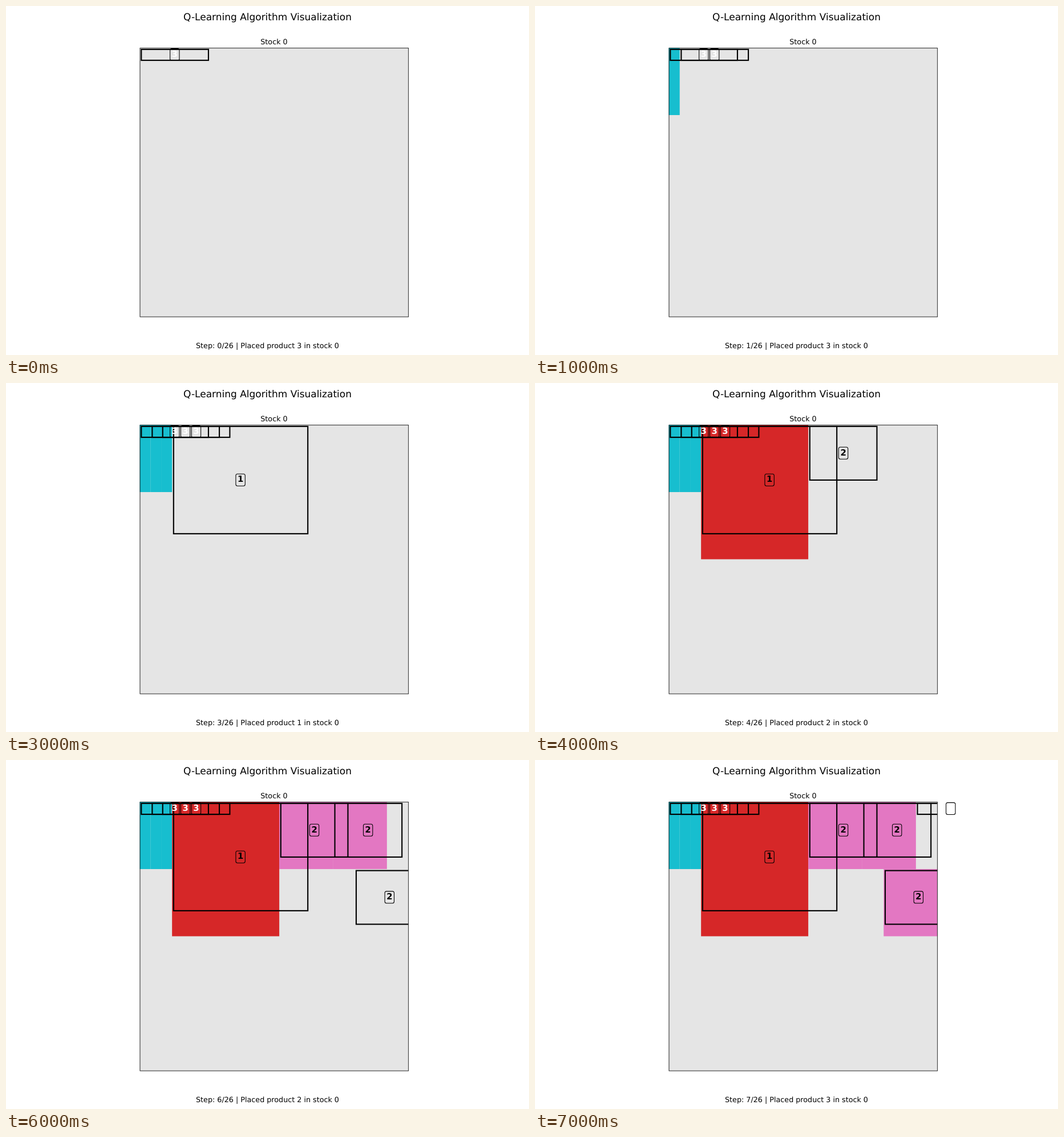
An HTML page for the animation above (8000 ms loop, 917 by 611 pixels).

```html
<!DOCTYPE html>
<html lang="en">
<head>
<meta charset="utf-8">
<title>Q-Learning Algorithm Visualization</title>
<style>
  html, body { margin: 0; width: 100%; height: 100%; overflow: hidden; background: #fff; }
  svg { display: block; width: 917px; height: 611px; }
  text { font-family: "DejaVu Sans", sans-serif; font-size: 16.667px; text-anchor: middle; text-rendering: geometricPrecision; white-space: pre; }
  .title { font-size: 22.222px; }
  .label text { font-size: 19.444px; font-weight: bold; }
  .outline { fill: none; stroke: #000; stroke-width: 2.78; }
  .label rect { fill: none; stroke: #000; stroke-width: 1.39; }
  .axes { fill: none; stroke: #000; stroke-width: 1.11; }
</style>
</head>
<body>
<svg viewBox="0 0 1200 800" preserveAspectRatio="none">
  <clipPath id="plot"><rect x="307" y="96" width="616" height="616"/></clipPath>
  <text class="title" x="600" y="33">Q-Learning Algorithm Visualization</text>
  <text x="615" y="87.7">Stock 0</text>
  <rect x="307" y="96" width="616" height="616" fill="#e5e5e5"/>
  <g id="fills"></g>
  <g id="outlines" clip-path="url(#plot)"></g>
  <rect class="axes" x="307.5" y="96.5" width="616" height="616"/>
  <g id="labels"></g>
  <text id="caption" x="600" y="784"></text>
</svg>
<script>
const STEP_MS = 1000, LEFT = 307, TOP = 96, CELL = 6.16;

// Size in cells, fill and label colour of each product
const products = {
  1: { w: 50, h: 40, fill: '#d62728', ink: '#000' },
  2: { w: 25, h: 20, fill: '#e377c2', ink: '#000' },
  3: { w: 25, h: 4, fill: '#17becf', ink: '#fff' }
};

// One placement per step: product, column, row
const placements = [
  [3, 0, 0], [3, 4, 0], [3, 8, 0], [1, 12, 0],
  [2, 52, 0], [2, 72, 0], [2, 80, 25], [3, 92, 0]
];

const byId = id => document.getElementById(id);
const snap = v => Math.round(v) + 0.5;

function add(parent, tag, attrs) {
  const el = document.createElementNS('http://www.w3.org/2000/svg', tag);
  for (const key in attrs) el.setAttribute(key, attrs[key]);
  return parent.appendChild(el);
}

function addBox(parent, x0, y0, x1, y1, attrs) {
  return add(parent, 'rect', { x: x0, y: y0, width: x1 - x0, height: y1 - y0, ...attrs });
}

const pieces = placements.map(([id, col, row]) => {
  const { w, h, fill, ink } = products[id];
  const x = LEFT + col * CELL, y = TOP + row * CELL;

  // The filled area is transposed relative to the outline
  const area = addBox(byId('fills'), Math.round(x), Math.round(y),
    Math.round(x + h * CELL), Math.round(y + w * CELL), { fill });

  const ox = x + CELL / 2, oy = y + CELL / 2;
  const outline = addBox(byId('outlines'), snap(ox), snap(oy),
    snap(ox + w * CELL), snap(oy + h * CELL), { class: 'outline' });

  const cx = ox + w * CELL / 2, cy = oy + h * CELL / 2;
  const label = add(byId('labels'), 'g', { class: 'label' });
  addBox(label, cx - 10.7, cy - 13.7, cx + 10.7, cy + 13.7, { rx: 3.9 });
  add(label, 'text', { x: cx, y: Math.round(cy + 5), fill: ink }).textContent = id;

  return { area, outline, label };
});

function show(el, on) {
  el.style.display = on ? '' : 'none';
}

let shown = -1;
function draw(step) {
  if (step === shown) return;
  shown = step;
  pieces.forEach(({ area, outline, label }, i) => {
    show(area, i < step);
    show(outline, i <= step);
    show(label, i <= step);
  });
  byId('caption').textContent = `Step: ${step}/26 | Placed product ${placements[step][0]} in stock 0`;
}

const start = performance.now();
function tick() {
  draw(Math.floor((performance.now() - start) / STEP_MS) % placements.length);
  requestAnimationFrame(tick);
}
tick();
</script>
</body>
</html>
```
